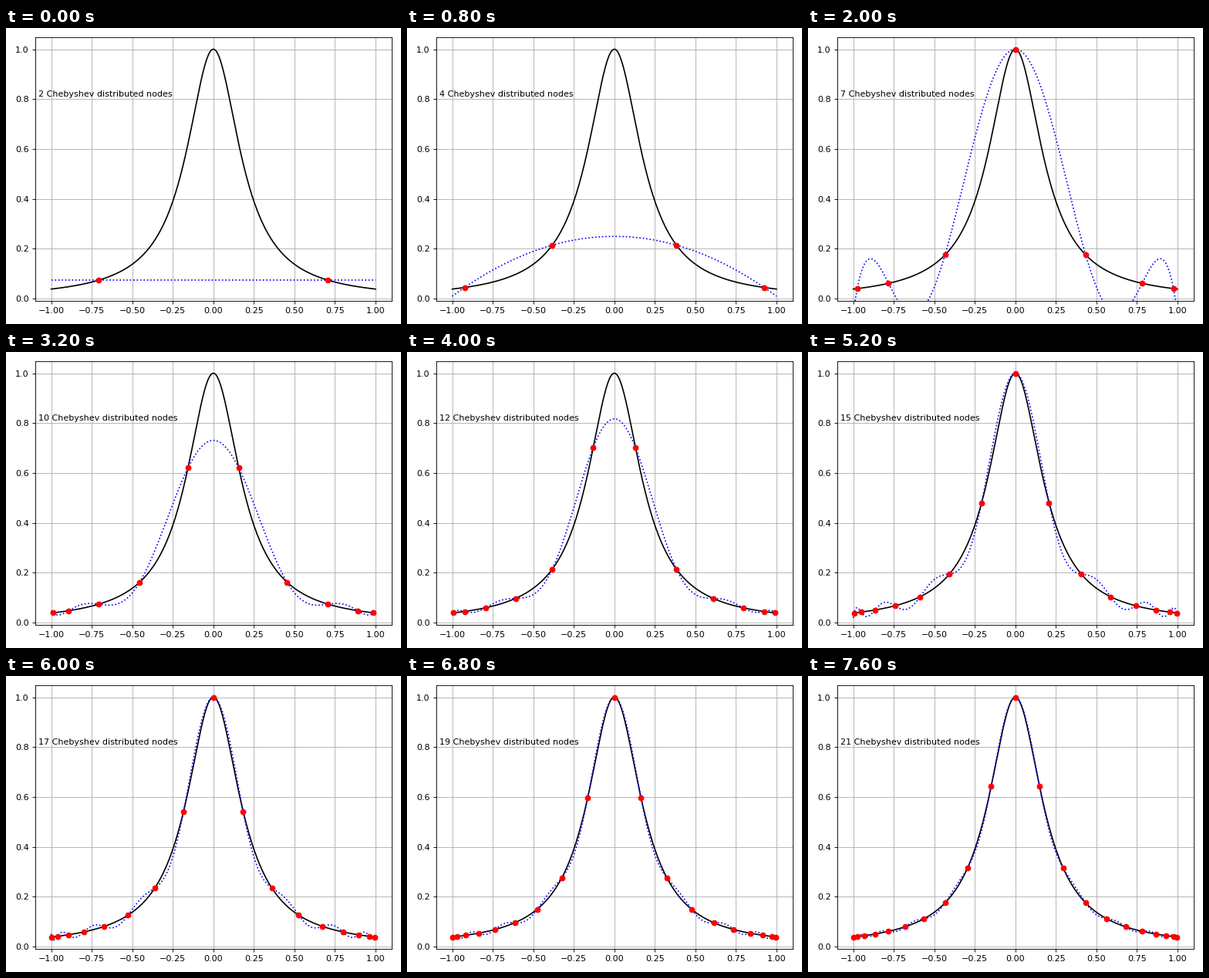
A matplotlib script for the animation above (8 s loop, 512 by 384 pixels).

```python
import numpy as np
import matplotlib.pyplot as plt
from matplotlib.animation import FuncAnimation
from numpy.polynomial import chebyshev as cheb

FIRST_COUNT = 2
LAST_COUNT = 21


def runge(x):
    return 1 / (1 + 25 * x**2)


x = np.linspace(-1, 1, 500)

fig, ax = plt.subplots(figsize=(6.4, 4.8), dpi=80)
ax.plot(x, runge(x), "k-")
ax.set_xlim(-1.1, 1.1)
ax.set_ylim(-0.0096, 1.048)
ax.grid(True)
fig.tight_layout()

interpolant, = ax.plot([], [], "b:")
nodes, = ax.plot([], [], "ro")
label = ax.text(-1.08, 0.81, "")


def update(frame):
    count = FIRST_COUNT + frame
    points = cheb.chebpts1(count)
    coefficients = cheb.chebinterpolate(runge, count - 1)
    interpolant.set_data(x, cheb.chebval(x, coefficients))
    nodes.set_data(points, runge(points))
    label.set_text(f"{count} Chebyshev distributed nodes")
    return interpolant, nodes, label


animation = FuncAnimation(
    fig, update, frames=LAST_COUNT - FIRST_COUNT + 1,
    interval=400, repeat=True, repeat_delay=0,
)
plt.show()
```
